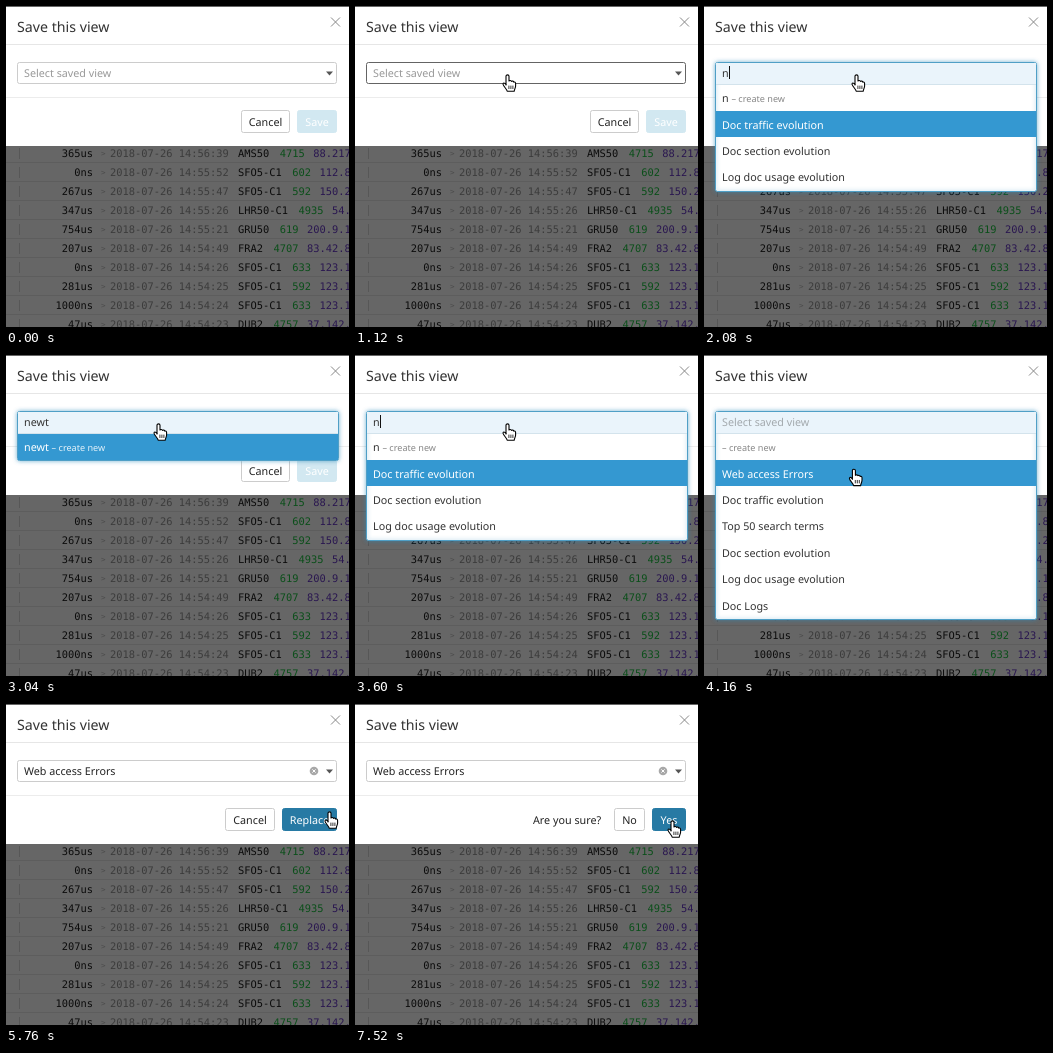
These frames come from a looping animation (343x321 px, 8000 ms). An HTML page with a canvas:

```html
<!DOCTYPE html>
<html lang="en">
<head>
<meta charset="utf-8">
<title>Save this view</title>
<style>
html, body { margin: 0; width: 100%; height: 100%; overflow: hidden; background: #666; }
canvas { display: block; width: 343px; height: 321px; }
</style>
</head>
<body>
<canvas id="stage" width="343" height="321"></canvas>
<script>
const ctx = document.getElementById('stage').getContext('2d');
const LOOP = 8000, STEP = 80;
const SANS = '"Noto Sans", "Open Sans", sans-serif';
const MONO = '"DejaVu Sans Mono", "Noto Sans Mono", monospace';
const BODY = `10.75px ${SANS}`;
const SMALL = `9.1px ${SANS}`;
const LOG = `10.4px ${MONO}`;
const BLUE = '#3498d1', BUTTON = '#277aa4';
const ROW = 26.4, LIST_TOP = 79;

const logs = [
  ['365us', '56:39', 'AMS50', '4715', '88.217.'],
  ['0ns', '55:52', 'SFO5-C1', '602', '112.8'],
  ['267us', '55:47', 'SFO5-C1', '592', '150.2'],
  ['347us', '55:26', 'LHR50-C1', '4935', '54.'],
  ['754us', '55:21', 'GRU50', '619', '200.9.1'],
  ['207us', '54:49', 'FRA2', '4707', '83.42.8'],
  ['0ns', '54:26', 'SFO5-C1', '633', '123.1'],
  ['281us', '54:25', 'SFO5-C1', '592', '123.1'],
  ['1000ns', '54:24', 'SFO5-C1', '633', '123.1'],
  ['47us', '54:23', 'DUB2', '4757', '37.142.']
];
const views = ['Web access Errors', 'Doc traffic evolution', 'Top 50 search terms',
  'Doc section evolution', 'Log doc usage evolution', 'Doc Logs'];

// Timelines: [time, value...]
const typing = [[0, ''], [2080, 'n'], [2240, 'new'], [2560, 'newt'], [3280, 'new'],
  [3440, 'ne'], [3600, 'n'], [3680, '']];
const caret = [[0, false], [1360, true], [1760, false], [2080, true], [3040, false],
  [3440, true], [4160, false], [4640, true], [4880, false]];
const pointer = [[0, 'none'], [320, 'arrow'], [960, 'hand'], [5040, 'arrow'], [5680, 'hand']];
const path = [[320, 164, 148], [440, 142, 116], [560, 129, 92], [720, 146, 60], [800, 152, 69],
  [3920, 152, 69], [4320, 148, 139], [4640, 142, 119], [5280, 142, 119], [5760, 323, 108],
  [5840, 323, 107], [6080, 317, 116], [6400, 317, 116], [6480, 317, 117]];

const hand = new Path2D('M4 2.2C4 .4 7 .4 7 2.2V7C7.4 6.2 9.3 6.3 9.5 7.4C10 6.8 11.6 7 11.8 8.2' +
  'C12.6 7.6 13.6 8.2 13.6 9.4V12C13.6 14 12.4 15 12.2 17.3H5.2C5 15.6 3 13.8 1.7 11.8' +
  'C.2 9.6 1.5 8.4 2.8 9.4L4 10.4Z');
const knuckles = new Path2D('M6.9 11.6v3.4M8.9 11.6v3.4M10.9 11.6v3.4M4 10v1.6');
const arrow = new Path2D('M0 0V13L3 10.2L5 14.8L7.2 13.9L5.2 9.4H9.3Z');

const valueAt = (track, t) => track.filter(key => key[0] <= t).pop()[1];

function pointAt(t) {
  const next = path.findIndex(key => key[0] > t);
  if (next < 0) return path[path.length - 1].slice(1);
  if (next === 0) return path[0].slice(1);
  const [t0, x0, y0] = path[next - 1], [t1, x1, y1] = path[next];
  const p = (t - t0) / (t1 - t0), e = p * p * (3 - 2 * p);
  return [x0 + (x1 - x0) * e, y0 + (y1 - y0) * e];
}

function text(str, x, y, color, font = BODY, align = 'left') {
  ctx.font = font;
  ctx.fillStyle = color;
  ctx.textAlign = align;
  ctx.fillText(str, x, y);
  return x + ctx.measureText(str).width;
}

function rect(x, y, w, h, color) {
  ctx.fillStyle = color;
  ctx.fillRect(x, y, w, h);
}

function box(x, y, w, h, fill, border) {
  ctx.beginPath();
  ctx.roundRect(x + .5, y + .5, w - 1, h - 1, 2);
  ctx.fillStyle = fill;
  ctx.fill();
  ctx.lineWidth = 1;
  ctx.strokeStyle = border;
  ctx.stroke();
}

function cross(x, y, r, color, width) {
  ctx.beginPath();
  ctx.moveTo(x - r, y - r); ctx.lineTo(x + r, y + r);
  ctx.moveTo(x + r, y - r); ctx.lineTo(x - r, y + r);
  ctx.lineWidth = width;
  ctx.strokeStyle = color;
  ctx.stroke();
}

function drawLogs() {
  rect(0, 140, 343, 181, '#666');
  logs.forEach(([took, time, host, id, ip], i) => {
    const y = 151 + 19 * i;
    rect(0, y + 5, 343, 1, '#5d5d5d');
    rect(13, y - 9, 1, 11, '#575757');
    text(took, 87, y, '#0c0c0c', LOG, 'right');
    text('>', 95, y - 1, '#4c4c4c', `7.5px ${MONO}`);
    text(`2018-07-26 14:${time}`, 104, y, '#3c3c3c', LOG);
    let x = text(host, 232, y, '#0c0c0c', LOG);
    x = text(id, x + 10.4, y, '#0b4f1a', LOG);
    text(ip, x + 8.6, y, '#2a1750', LOG);
  });
}

function drawModal() {
  rect(0, 0, 343, 140, '#fff');
  rect(0, 0, 343, 1, '#666');
  rect(0, 38, 343, 1, '#e6e6e6');
  rect(0, 91, 343, 1, '#ececec');
  text('Save this view', 11, 26, '#333', `14.2px ${SANS}`);
  cross(329.5, 16, 4.5, '#888', 1);
}

function drawSelect(t) {
  const hover = t < 5040 ? Math.max(0, Math.min(1, (t - 880) / 240)) : 0;
  const shade = Math.round(204 - 104 * hover);
  box(11, 56, 320, 22, '#fff', `rgb(${shade},${shade},${shade})`);
  ctx.beginPath();
  ctx.moveTo(320, 65.5); ctx.lineTo(327, 65.5); ctx.lineTo(323.5, 69.5);
  ctx.fillStyle = '#555';
  ctx.fill();
  if (t < 5040) {
    text('Select saved view', 18, 71, '#999');
    return;
  }
  text(views[0], 18, 71, '#222');
  ctx.beginPath();
  ctx.arc(308, 67, 4.3, 0, 7);
  ctx.fillStyle = '#a8a8a8';
  ctx.fill();
  cross(308, 67, 1.6, '#fff', 1);
}

function drawDropdown(t) {
  const query = valueAt(typing, t);
  const items = views.filter(name => name.includes(query));
  const y = pointAt(t)[1];
  let active = items.length ? 0 : -1;
  if (t > 3920 && y >= LIST_TOP) active = Math.floor((y - LIST_TOP) / ROW) - 1;

  const bottom = Math.round(LIST_TOP + ROW * (items.length + 1)) + 1;
  ctx.save();
  ctx.shadowColor = 'rgba(50,140,190,.6)';
  ctx.shadowBlur = 4;
  box(11, 56, 322, bottom - 56, '#fff', '#4f9fc6');
  ctx.restore();
  rect(12, 57, 320, 21, '#eaf4fb');
  rect(12, 78, 320, 1, '#d3e3ec');
  rect(12, LIST_TOP + Math.round(ROW * (active + 1)), 320, 26, BLUE);

  const end = query ? text(query, 18, 71, '#333') : 18;
  if (!query) text('Select saved view', 18, 71, '#a3a9ad');
  if (valueAt(caret, t)) rect(Math.round(end), 60, 1, 13, '#111');

  const on = active === -1;
  const label = query ? text(query + ' ', 18, 96, on ? '#fff' : '#333') : 18;
  text('– create new', label, 96, on ? '#e4f2fa' : '#888', SMALL);
  items.forEach((name, i) =>
    text(name, 18, 122.5 + ROW * i, i === active ? '#fff' : '#333'));
}

function button(label, x, w, primary) {
  box(x, 104, w, 23, primary || '#fff', primary || '#ccc');
  text(label, x + w / 2, 120, primary ? '#fff' : '#222', BODY, 'center');
}

function drawButtons(t) {
  if (t < 5120) {
    button('Cancel', 235, 49);
    button('Save', 291, 40, '#d2e8f1');
  } else if (t < 7280) {
    button('Cancel', 219, 50);
    button('Replace', 276, 55, BUTTON);
  } else {
    ctx.globalAlpha = Math.min(1, (t - 7200) / 320);
    text('Are you sure?', 178, 120, '#222');
    button('No', 259, 31);
    button('Yes', 297, 34, BUTTON);
    ctx.globalAlpha = 1;
  }
}

function drawPointer(t) {
  const kind = valueAt(pointer, t);
  if (kind === 'none') return;
  const [x, y] = pointAt(t);
  const isHand = kind === 'hand';
  const shape = isHand ? hand : arrow;
  ctx.save();
  ctx.translate(x - (isHand ? 5 : 0), y - (isHand ? 1 : 0));
  ctx.lineJoin = 'round';
  ctx.lineWidth = isHand ? 1.1 : 1.8;
  ctx.fillStyle = isHand ? '#fff' : '#000';
  ctx.strokeStyle = isHand ? '#000' : '#fff';
  if (isHand) {
    ctx.fill(shape);
    ctx.stroke(shape);
    ctx.lineWidth = .8;
    ctx.stroke(knuckles);
  } else {
    ctx.stroke(shape);
    ctx.fill(shape);
  }
  ctx.restore();
}

function draw(now) {
  const t = Math.floor((now % LOOP) / STEP) * STEP;
  ctx.textRendering = 'geometricPrecision';
  drawLogs();
  drawModal();
  drawButtons(t);
  if (t >= 1280 && t < 5040) drawDropdown(t);
  else drawSelect(t);
  drawPointer(t);
}

const start = performance.now();
function tick() {
  draw(performance.now() - start);
  requestAnimationFrame(tick);
}
tick();
</script>
</body>
</html>
```
